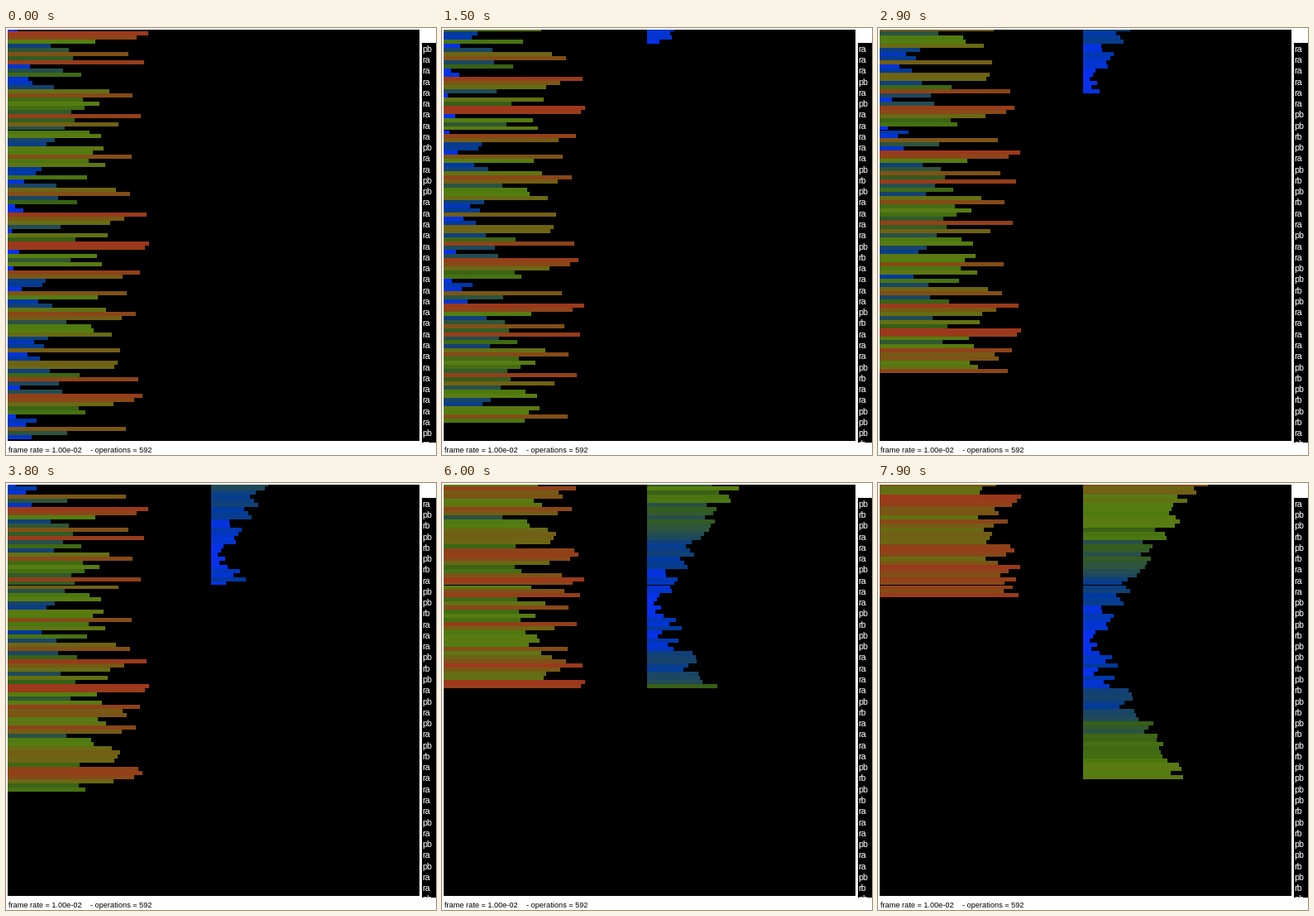
A matplotlib script that plays this animation: 520x516 px, repeating every 8000 ms.

```python
import numpy as np
import matplotlib.pyplot as plt
from matplotlib.animation import FuncAnimation
from matplotlib.patches import Rectangle

W, H, DPI = 520, 516, 100
FRAMES, INTERVAL = 80, 100
CHUNK = 15                      # how far ahead of the counter a value may be pushed
ROW, TOP = 4.98, -1             # bar height and y of the first bar
LINE, ROWS = 13.27, 37          # operation list spacing and visible lines

START = [
    4, 98, 90, 60, 28, 41, 84, 44, 95, 13,
    37, 50, 12, 15, 30, 70, 87, 51, 63, 52,
    43, 93, 45, 77, 38, 56, 64, 31, 25, 66,
    58, 86, 55, 67, 21, 17, 54, 9, 32, 75,
    85, 33, 47, 2, 8, 97, 81, 71, 35, 0,
    69, 46, 99, 96, 5, 61, 42, 65, 1, 92,
    80, 24, 22, 7, 83, 62, 19, 29, 68, 89,
    79, 39, 57, 59, 72, 26, 16, 23, 78, 11,
    20, 76, 74, 27, 49, 91, 34, 6, 36, 94,
    88, 73, 48, 53, 3, 18, 10, 82, 40, 14,
]

STOPS = [0, 12, 20, 30, 40, 46, 58, 64, 72, 80, 88, 99]
TINTS = np.array([
    (8, 48, 245), (3, 52, 212), (0, 58, 158), (20, 66, 112),
    (45, 84, 62), (54, 95, 22), (82, 125, 15), (88, 124, 18),
    (104, 106, 20), (118, 90, 21), (136, 72, 24), (158, 55, 28),
]) / 255


def tint(rank):
    return [np.interp(rank, STOPS, TINTS[:, c]) for c in range(3)]


def solve(order):
    """Push everything to stack b, keeping low values at its ends."""
    a, b = list(order), []
    ops, states = [], [(a[:], b[:])]

    def log(op):
        ops.append(op)
        states.append((a[:], b[:]))

    while a:
        value, count = a.pop(0), len(b)
        if value > count + CHUNK:
            a.append(value)
            log("ra")
            continue
        b.insert(0, value)
        log("pb")
        if value <= count:
            b.append(b.pop(0))
            log("rb")
    return ops, states


OPS, STATES = solve(START)

fig = plt.figure(figsize=(W / DPI, H / DPI), dpi=DPI, facecolor="white")


def panel(x0, y0, x1, y1):
    """Black box whose data units are stage pixels."""
    ax = fig.add_axes([x0 / W, 1 - y1 / H, (x1 - x0) / W, (y1 - y0) / H])
    ax.set(xlim=(x0, x1), ylim=(y1, y0), xticks=[], yticks=[], facecolor="black")
    for spine in ax.spines.values():
        spine.set_visible(False)
    return ax


def font(px):
    return dict(family="Liberation Sans", fontsize=px * 72 / DPI, va="baseline")


stage = panel(2, 2, 500, 499)
side = panel(503, 18, 520, 501)

bars = [
    stage.add_patch(Rectangle((0, 0), 8.3 + 1.677 * r, ROW, color=tint(r), lw=0, aa=False))
    for r in range(len(START))
]
lines = [
    side.text(503.6, 28.7 + LINE * i, "", color="white", clip_on=True, **font(10.8))
    for i in range(ROWS)
]
for x, label in [(2.8, "frame rate = 1.00e-02"), (102, "- operations = 592")]:
    fig.text(x / W, 1 - 513 / H, label, color="black", **font(9.2))


def draw(frame):
    done = max(0, round((frame - 4.1) * 3.03))
    for left, stack in zip((-1, 248), STATES[done]):
        for i, rank in enumerate(stack):
            bars[rank].set_xy((left, TOP + ROW * i))
    first = max(done - 1, 0)
    shown = OPS[first:first + ROWS]
    for i, line in enumerate(lines):
        line.set_text(shown[i] if i < len(shown) else "")
    return bars + lines


anim = FuncAnimation(fig, draw, frames=FRAMES, interval=INTERVAL, repeat=True, repeat_delay=0)
plt.show()
```
